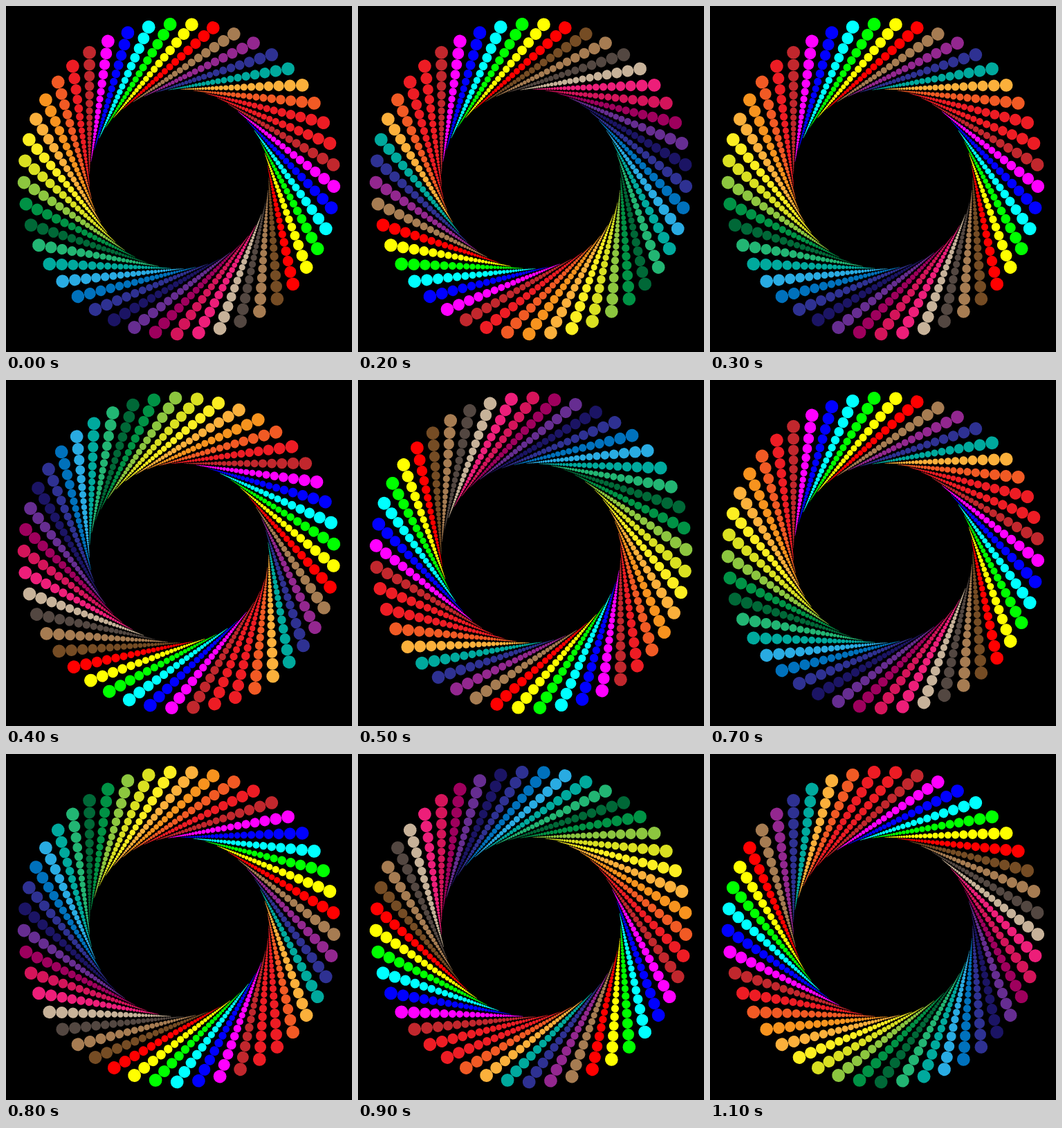
An HTML page that plays this animation: 500x500 px, repeating every 1200 ms.

```html
<!DOCTYPE html>
<html>
<head>
<meta charset="utf-8">
<style>
  html, body { margin: 0; width: 100%; height: 100%; overflow: hidden; background: #000; }
  svg { display: block; width: 100%; height: 100%; }
</style>
</head>
<body>
<svg viewBox="-250 -250 500 500"><g id="wheel"></g></svg>
<script>
const wheel = document.getElementById('wheel');

// Spoke colours, clockwise, starting with the spoke that hangs straight down at the left.
const colors = `c1272d f0f 00f 0ff 0f0 ff0 f00 a67c52 93278f 2e3192 00a99d fbb03b f15a24
  ed1c24 ed1c24 c1272d f0f 00f 0ff 0f0 ff0 f00 754c24 a67c52 534741 c7b299 ed1e79 d4145a
  9e005d 662d91 1b1464 2e3192 0071bc 29abe2 00a99d 22b573 006837 009245 8cc63f d9e021
  fcee21 fbb03b f7931e f15a24 ed1c24`.split(/\s+/);

const INNER = 129.4;   // radius of the circle every spoke touches
const LENGTH = 182.8;  // from the outer dot to the touching point
const DOT = 9.4;
const SHRINK = 0.902;
const DOTS = 32;

function dots() {
  let out = '';
  for (let k = 0, s = 1; k < DOTS; k++, s *= SHRINK) {
    out += `<circle cx="${-INNER}" cy="${-LENGTH * s}" r="${DOT * s}"/>`;
  }
  return out;
}

wheel.innerHTML = colors.map((color, i) =>
  `<g fill="#${color}" transform="rotate(${i * 360 / colors.length})">${dots()}</g>`
).join('');

// Three full turns per loop, made of 3, 4 and 5 equal steps.
const angles = [3, 4, 5].flatMap(n => Array.from({ length: n }, (_, i) => i * 360 / n));
const STEP = 100;
const start = performance.now();

function draw() {
  const step = Math.floor((performance.now() - start) / STEP) % angles.length;
  wheel.setAttribute('transform', `rotate(${angles[step]})`);
  requestAnimationFrame(draw);
}
draw();
</script>
</body>
</html>
```
